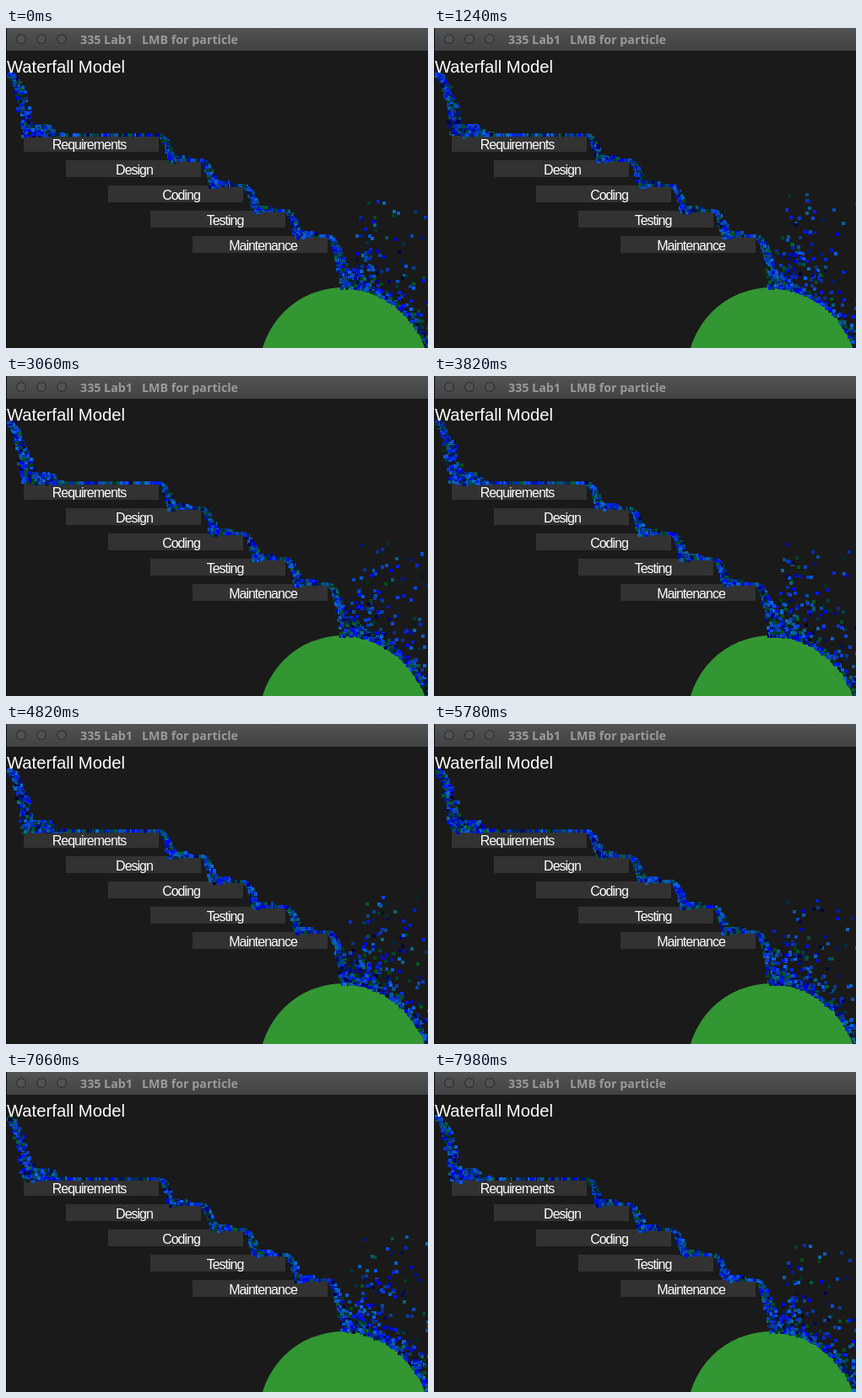
An HTML page with a canvas that plays this animation: 500x380 px, repeating every 8 s.

```html
<!DOCTYPE html>
<html lang="en">
<head>
<meta charset="utf-8">
<title>Waterfall Model</title>
<style>
  html, body { margin: 0; width: 100%; height: 100%; overflow: hidden; background: #1a1a1a; }
  canvas { display: block; }
</style>
</head>
<body>
<canvas id="stage" width="500" height="380"></canvas>
<script>
const ctx = document.getElementById('stage').getContext('2d');

const LOOP_MS = 8000, FRAMES = 200, STEPS_PER_FRAME = 2;
const BORN_PER_FRAME = 10, GRAVITY = 0.1, DOT = 4;
const HILL = { x: 400, y: 408, r: 100 };
const LEDGES = [
  ['Requirements', 98.5], ['Design', 152], ['Coding', 207.5], ['Testing', 259.5], ['Maintenance', 304.5]
].map(([label, labelX], i) => ({ label, labelX, x: 21 + 50 * i, y: 127 + 30 * i, w: 160, h: 20 }));

let seed = 335;
function random() {
  seed = (seed + 0x6D2B79F5) | 0;
  let n = Math.imul(seed ^ (seed >>> 15), 1 | seed);
  n = (n + Math.imul(n ^ (n >>> 7), 61 | n)) ^ n;
  return ((n ^ (n >>> 14)) >>> 0) / 4294967296;
}
const between = (a, b) => a + (b - a) * random();

function randomColor() {
  const kind = random();
  if (kind < 0.2) return `rgb(0,${between(40, 95) | 0},${between(15, 70) | 0})`;
  if (kind < 0.38) return `rgb(0,${between(0, 35) | 0},${between(40, 150) | 0})`;
  if (kind < 0.6) return `rgb(0,${between(0, 40) | 0},${between(190, 255) | 0})`;
  return `rgb(10,${between(45, 110) | 0},${between(120, 240) | 0})`;
}

function landOnLedge(p, oldY) {
  for (const l of LEDGES) {
    if (p.x >= l.x - 4 && p.x <= l.x + l.w && oldY <= l.y && p.y > l.y) {
      p.y = l.y;
      p.vy *= -0.4;
    }
  }
}

function bounceOffHill(p) {
  const dx = p.x - HILL.x, dy = p.y - HILL.y, d = Math.hypot(dx, dy);
  if (d >= HILL.r) return;
  const nx = dx / d, ny = dy / d;
  p.x = HILL.x + nx * HILL.r;
  p.y = HILL.y + ny * HILL.r;
  if (!p.splashed) {
    p.splashed = true;
    p.vx = between(0.3, 1.9);
    p.vy = -0.9 - 3.9 * random() ** 2.8;
    return;
  }
  const vn = p.vx * nx + p.vy * ny;
  if (vn < 0) {
    const push = (1 + between(0.3, 0.9)) * vn;
    p.vx = Math.max(0.3, p.vx - push * nx);
    p.vy -= push * ny;
  }
}

// The whole flight of one drop, one [x, y] pair per frame.
function makeDrop(i) {
  const p = { x: between(1, 6), y: between(53, 57), vx: between(0.45, 0.9), vy: between(0, 0.3) };
  const path = [];
  for (let step = i % STEPS_PER_FRAME; p.x < 503 && p.y < 383; step++) {
    const oldY = p.y;
    p.vy += GRAVITY;
    p.x += p.vx;
    p.y += p.vy;
    if (step % STEPS_PER_FRAME === 0) path.push([Math.round(p.x), Math.round(p.y)]);
    landOnLedge(p, oldY);
    bounceOffHill(p);
  }
  return { path, color: randomColor(), birth: Math.floor(i / BORN_PER_FRAME) };
}
const drops = Array.from({ length: FRAMES * BORN_PER_FRAME }, (_, i) => makeDrop(i));

function text(str, x, y, font, color, align = 'left', spacing = '0px') {
  ctx.font = font;
  ctx.fillStyle = color;
  ctx.textAlign = align;
  ctx.letterSpacing = spacing;
  ctx.fillText(str, x, y);
}

function disc(x, y, r, color) {
  ctx.fillStyle = color;
  ctx.beginPath();
  ctx.arc(x, y, r, 0, 2 * Math.PI);
  ctx.fill();
}

function drawTitleBar() {
  const shade = ctx.createLinearGradient(0, 0, 0, 27);
  shade.addColorStop(0, '#525355');
  shade.addColorStop(1, '#414244');
  ctx.fillStyle = shade;
  ctx.fillRect(0, 0, 500, 27);
  for (const x of [18, 42, 66]) {
    disc(x, 13, 6, '#303030');
    disc(x, 13, 4.8, '#505153');
  }
  text('335 Lab1   LMB for particle', 88, 19, 'bold 14.25px "Open Sans", sans-serif', '#9a9a9a');
}

function drawDrops(frame) {
  for (const { path, color, birth } of drops) {
    ctx.fillStyle = color;
    for (let age = (frame - birth + FRAMES) % FRAMES; age < path.length; age += FRAMES) {
      const [x, y] = path[age];
      ctx.fillRect(x - DOT / 2, y - DOT / 2, DOT, DOT);
    }
  }
}

// Frames last 40 ms, except one of 60 ms and a last one of 20 ms.
function frameAt(ms) {
  return ms < 1300 ? Math.min(31, Math.floor(ms / 40)) : 32 + Math.floor((ms - 1300) / 40);
}

function draw(frame) {
  ctx.fillStyle = '#1a1a1a';
  ctx.fillRect(0, 0, 500, 380);
  ctx.fillStyle = '#323232';
  for (const l of LEDGES) ctx.fillRect(l.x, l.y, l.w, l.h);
  disc(HILL.x, HILL.y, HILL.r, '#329632');
  drawDrops(frame);
  const sans = '"Liberation Sans", Arial, sans-serif';
  text('Waterfall Model', 1, 53, `20.25px ${sans}`, '#fff');
  for (const l of LEDGES) text(l.label, l.labelX, l.y + 17, `16px ${sans}`, '#fff', 'center', '-1px');
  drawTitleBar();
  ctx.fillStyle = '#0c0c0c';
  ctx.fillRect(0, 0, 1, 380);
}

function tick() {
  draw(frameAt(performance.now() % LOOP_MS));
  requestAnimationFrame(tick);
}
tick();
</script>
</body>
</html>
```
